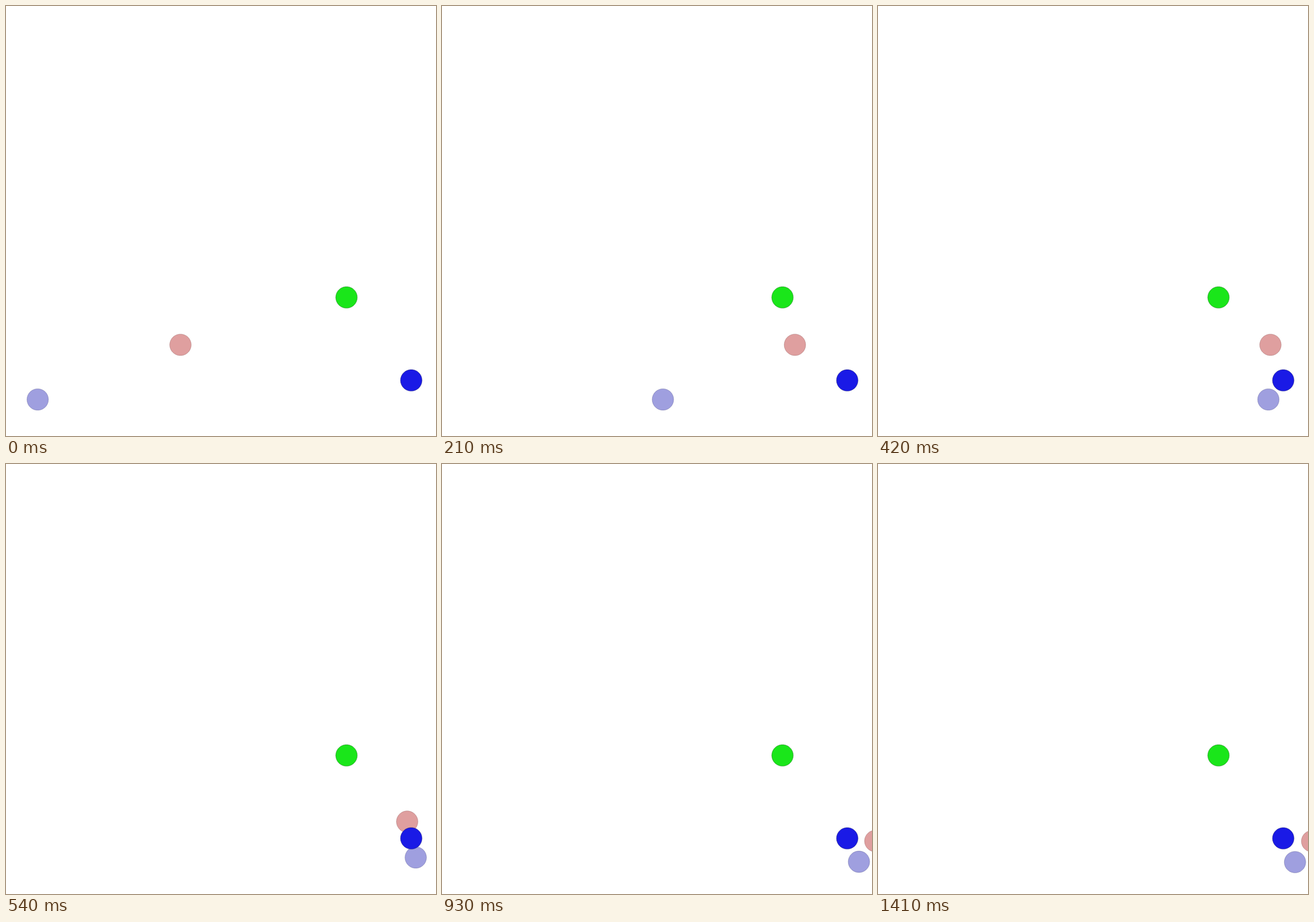
An HTML page with a canvas that plays this animation: 700 by 700 pixels, repeating every 1530 ms.

```html
<!DOCTYPE html>
<html lang="en">
<head>
<meta charset="utf-8">
<title>Two agents</title>
<style>
  html, body { margin: 0; width: 100%; height: 100%; overflow: hidden; background: #fff; }
  canvas { display: block; width: 700px; height: 700px; }
</style>
</head>
<body>
<canvas id="stage" width="700" height="700"></canvas>
<script>
const ctx = document.getElementById('stage').getContext('2d');

const STEP = 30, LOOP = 1530, LAST = 47;
const RADIUS = 17.5, SIDES = 30;
const DAMPING = 0.75, PUSH = 17.5, SOFTNESS = 0.35;

const landmarks = [
  { x: 554.3, y: 474.4, rgb: [26, 230, 26], alpha: 1 },
  { x: 659.7, y: 609.4, rgb: [26, 26, 230], alpha: 1 }
];

// Each agent gets a unit thrust for the given step, or none.
const agents = [
  {
    x: 284, y: 551.6, rgb: [191, 64, 64], alpha: 0.5,
    thrust: n => n <= 6 || n === 18 ? [1, 0] : n === 11 ? [-1, 0] : n === 17 ? [0, 1] : [0, 0]
  },
  {
    x: 51.6, y: 640.6, rgb: [64, 64, 191], alpha: 0.5,
    thrust: n => n <= 9 ? [1, 0] : [0, 0]
  }
];

// Damped motion with a soft contact force between the two agents.
function simulate() {
  const bodies = agents.map(({ x, y }) => ({ x, y, vx: 0, vy: 0 }));
  const [a, b] = bodies;
  const snapshot = () => bodies.map(({ x, y }) => ({ x, y }));
  const track = [snapshot()];
  for (let n = 1; n <= LAST; n++) {
    const dx = a.x - b.x, dy = a.y - b.y, dist = Math.hypot(dx, dy);
    const force = SOFTNESS * Math.log1p(Math.exp((2 * RADIUS - dist) / SOFTNESS));
    bodies.forEach((body, i) => {
      const [tx, ty] = agents[i].thrust(n);
      const sign = i ? -1 : 1;
      body.vx = body.vx * DAMPING + tx * PUSH + sign * force * dx / dist;
      body.vy = body.vy * DAMPING + ty * PUSH + sign * force * dy / dist;
      body.x += body.vx;
      body.y += body.vy;
    });
    track.push(snapshot());
  }
  return track;
}

function drawDisc({ x, y }, { rgb, alpha }) {
  ctx.beginPath();
  for (let i = 0; i < SIDES; i++) {
    const angle = i * 2 * Math.PI / SIDES;
    ctx.lineTo(x + RADIUS * Math.cos(angle), y + RADIUS * Math.sin(angle));
  }
  ctx.closePath();
  ctx.fillStyle = `rgba(${rgb}, ${alpha})`;
  ctx.fill();
  ctx.strokeStyle = `rgba(${rgb.map(c => c >> 1)}, ${alpha / 2})`;
  ctx.stroke();
}

const track = simulate();
const start = performance.now();

function draw() {
  const time = Math.max(0, performance.now() - start) % LOOP;
  const pose = track[Math.min(LAST, Math.floor(time / STEP))];
  ctx.fillStyle = '#fff';
  ctx.fillRect(0, 0, 700, 700);
  agents.forEach((agent, i) => drawDisc(pose[i], agent));
  landmarks.forEach(mark => drawDisc(mark, mark));
  requestAnimationFrame(draw);
}
draw();
</script>
</body>
</html>
```
